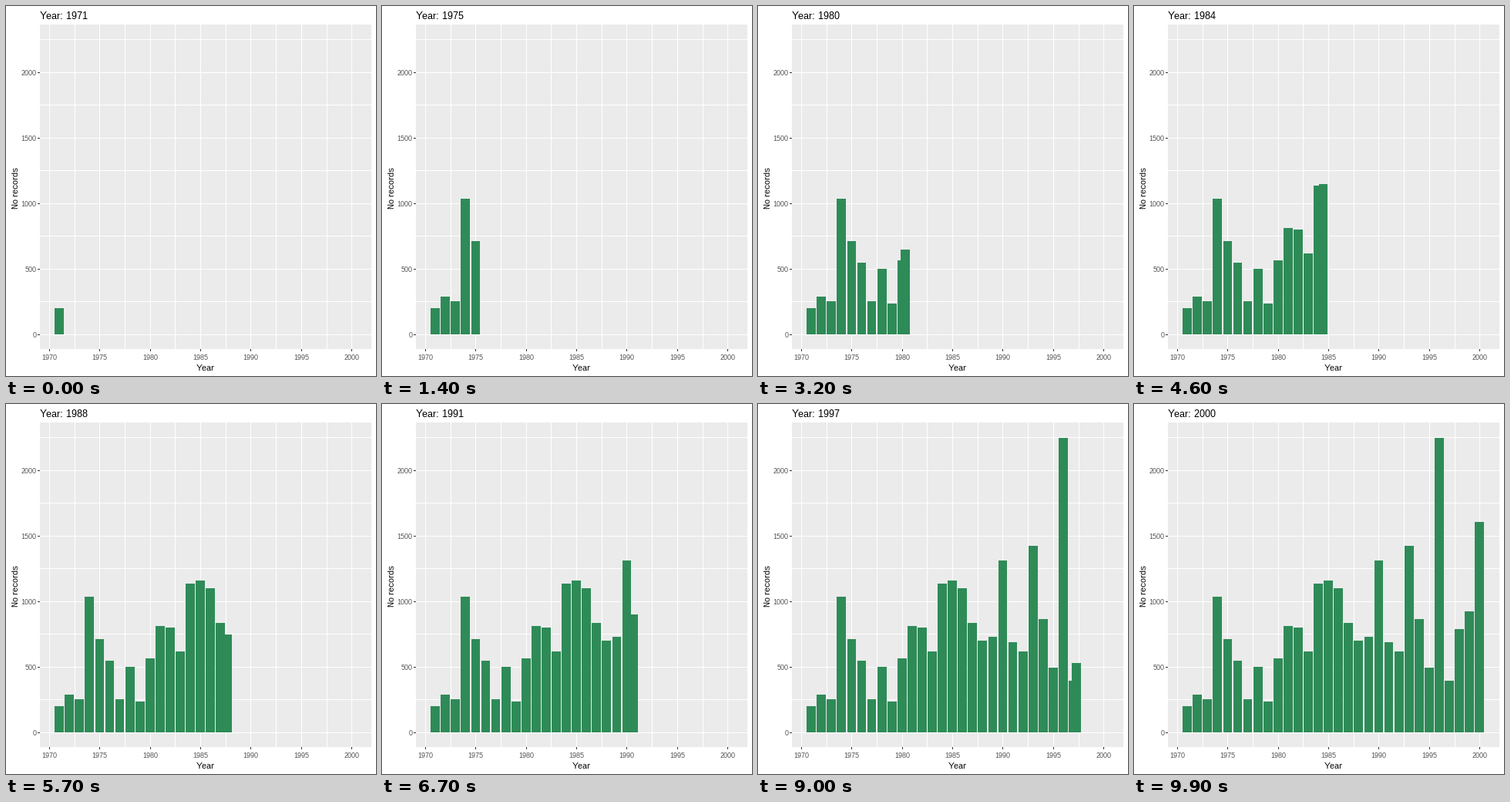
Recreate the animation shown at these times as a matplotlib script. Size 480 by 480 pixels, loop 10000 ms.

```python
import matplotlib.pyplot as plt
from matplotlib.animation import FuncAnimation
from matplotlib.patches import Rectangle

plt.rcParams.update({
    "font.family": "Liberation Sans",
    "text.hinting": "native",
    "text.hinting_factor": 1,
})

SIZE, FRAMES = 480, 100
FIRST, LAST = 1971, 2000
GREEN, PANEL, TICK, LABEL = "#2E8B57", "#EBEBEB", "#333333", "#4D4D4D"
LEFT, RIGHT, TOP, BOTTOM = 44, 474, 24, 445

RECORDS = [200, 288, 254, 1035, 712, 547, 254, 500, 236, 565,
           812, 800, 618, 1135, 1160, 1100, 836, 700, 730, 1312,
           690, 618, 1424, 866, 496, 2246, 395, 789, 925, 1607]

SPAN = LAST - FIRST
KEYS = [round(k * (FRAMES - 1) / SPAN) for k in range(SPAN + 1)]

fig = plt.figure(figsize=(SIZE / 72, SIZE / 72), dpi=72, facecolor="white")
ax = fig.add_axes([0, 0, 1, 1])
ax.set(xlim=(0, SIZE), ylim=(SIZE, 0))
ax.axis("off")


def px(year):
    return round(43.73 + (year - 1969.055) * 13.07)


def py(value):
    return round(426 - value * 0.1701)


def box(x0, y0, x1, y1, color, z=1):
    return ax.add_patch(Rectangle((x0, y0), x1 - x0, y1 - y0, fc=color,
                                  lw=0, antialiased=False, zorder=z))


def label(x, y, text, size, color="black", ha="left", **kw):
    return ax.text(x, y, text, size=size, color=color, ha=ha,
                   va="baseline", zorder=5, **kw)


def bar_shape(year, value):
    x, y = px(year - 0.45), py(value)
    return x, y, px(year + 0.45), py(0)


# Panel, grid and axes
box(LEFT, TOP, RIGHT, BOTTOM, PANEL, 0)
for value in range(0, 2251, 250):
    y = py(value)
    box(LEFT, y, RIGHT, y + 1, "white")
    if value % 500 == 0:
        box(LEFT - 3, y, LEFT, y + 1, TICK)
        label(39.5, y + 4, str(value), 9, LABEL, "right")
for half in range(13):
    year = 1970 + 2.5 * half
    x = px(year)
    box(x, TOP, x + 1, BOTTOM, "white")
    if half % 2 == 0:
        box(x, BOTTOM, x + 1, BOTTOM + 3, TICK)
        label(x + 0.5, 459, f"{year:.0f}", 9, LABEL, "center")

label(259, 473, "Year", 11, ha="center")
label(16, 236, "No records", 11, ha="center", rotation=90,
      rotation_mode="anchor")
title = label(44, 17, "", 13)

bars = [box(*bar_shape(FIRST + k, v), GREEN, 2) for k, v in enumerate(RECORDS)]
mover = box(0, 0, 1, 1, GREEN, 3)


def update(i):
    for key, bar in zip(KEYS, bars):
        bar.set_visible(key <= i)
    k = min(sum(key <= i for key in KEYS) - 1, SPAN - 1)
    t = (i - KEYS[k]) / (KEYS[k + 1] - KEYS[k])
    value = RECORDS[k] + t * (RECORDS[k + 1] - RECORDS[k])
    x0, y0, x1, y1 = bar_shape(FIRST + k + t, value)
    mover.set_bounds(x0, y0, x1 - x0, y1 - y0)
    title.set_text(f"Year: {round(FIRST + SPAN * i / (FRAMES - 1))}")
    return [title, mover, *bars]


anim = FuncAnimation(fig, update, frames=FRAMES, interval=100, repeat=True,
                     init_func=lambda: update(0))
plt.show()
```
